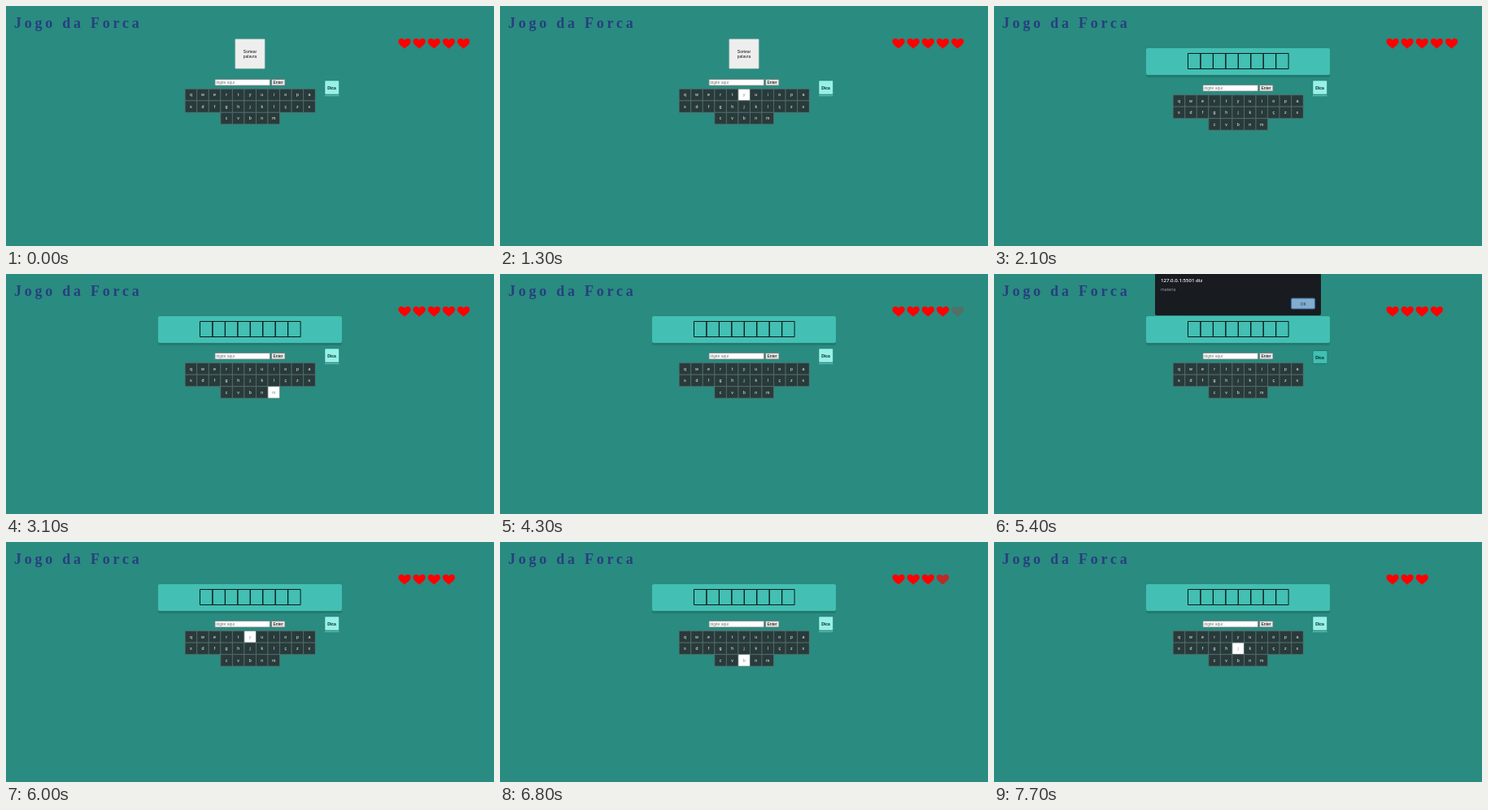
Animation, 600 px wide and 296 px high, one loop 8 s. Source, as an HTML page with a canvas:

```html
<!DOCTYPE html>
<html lang="pt">
<head>
<meta charset="utf-8">
<title>Jogo da Forca</title>
<style>
  html, body { margin: 0; width: 100%; height: 100%; overflow: hidden; background: #2a8b80; }
  canvas { display: block; }
</style>
</head>
<body>
<canvas id="stage" width="600" height="296"></canvas>
<script>
const ctx = document.getElementById('stage').getContext('2d');
const LOOP = 8000;
const SANS = '"Liberation Sans", Arial, sans-serif';
const DIALOG = '"Open Sans", "Noto Sans", sans-serif';
const KEY_ROWS = ['qwertyuiopa', 'sdfghjklçzx', 'cvbnm'];
const KEY = 14.55;

// Each entry: start time and what the pointer rests on from then.
const pointer = [
  [0, ''], [500, 'j'], [600, 'y'], [700, 'sortear'],
  [1100, 'y'], [1800, 'sortear'], [2000, ''],
  [2700, 'y'], [2800, 'j'], [2900, 'n'], [3000, 'm'],
  [3800, ''], [4800, 'dica'], [5500, ''], [5700, 'y'],
  [6100, 'j'], [6300, 'b'], [7500, 'h'], [7600, 'j']
];
const BOARD_AT = 2000;
const ALERT = [5000, 5500];
const MISSES = [3500, 6500];
const FADE = 1000;

function box(x, y, w, h, fill, stroke, line = 1, radius = 0) {
  ctx.beginPath();
  ctx.roundRect(x, y, w, h, radius);
  if (fill) { ctx.fillStyle = fill; ctx.fill(); }
  if (stroke) { ctx.strokeStyle = stroke; ctx.lineWidth = line; ctx.stroke(); }
}

function text(str, x, y, font, color, align = 'center') {
  ctx.font = font;
  ctx.fillStyle = color;
  ctx.textAlign = align;
  ctx.fillText(str, x, y);
}

function drawTitle() {
  ctx.letterSpacing = '3.75px';
  text('Jogo da Forca', 10, 27, 'bold 18px "Liberation Serif", "Times New Roman", serif', '#263f7e', 'left');
  ctx.letterSpacing = '0px';
}

function drawHeart(cx, alpha) {
  ctx.globalAlpha = alpha;
  ctx.fillStyle = '#f00';
  ctx.beginPath();
  ctx.moveTo(cx, 52.6);
  ctx.bezierCurveTo(cx - 3, 49.6, cx - 7.6, 47.6, cx - 7.6, 43.6);
  ctx.bezierCurveTo(cx - 7.6, 39, cx - 1.8, 38.8, cx, 42.3);
  ctx.bezierCurveTo(cx + 1.8, 38.8, cx + 7.6, 39, cx + 7.6, 43.6);
  ctx.bezierCurveTo(cx + 7.6, 47.6, cx + 3, 49.6, cx, 52.6);
  ctx.fill();
  ctx.globalAlpha = 1;
}

function drawHearts(t) {
  for (let i = 0; i < 5; i++) {
    const miss = MISSES[4 - i] ?? Infinity;
    const alpha = Math.max(0, Math.min(1, 1 - (t - miss) / FADE));
    drawHeart(490 + i * 18.15, alpha);
  }
}

function drawSortear(hover) {
  box(282, 41, 36, 36, hover ? '#e2e2e2' : '#eee', '#d5d9d8', 0.8);
  text('Sortear', 300, 57.8, `5px ${SANS}`, '#111');
  text('palavra', 300, 64, `5px ${SANS}`, '#111');
}

function drawBoard() {
  box(187, 54, 226, 34, '#247a70', null, 1, 2);
  box(187, 52, 226, 33, '#43bfb3', null, 1, 2);
  for (let i = 0; i < 8; i++) box(238.5 + i * 15.45, 58.5, 15.45, 19, null, '#0b1a19');
}

function drawInput(y) {
  box(257, y + 0.5, 67.5, 7.5, '#fff', '#7c8583', 0.8);
  text('digite aqui', 258.3, y + 5.9, `5px ${SANS}`, '#777', 'left');
  box(326.5, y + 0.5, 16.5, 7.5, '#e6e6e6', '#777', 0.8, 0.5);
  text('Enter', 334.5, y + 6, `5px ${SANS}`, '#000');
}

function drawKeys(top, hovered) {
  KEY_ROWS.forEach((row, r) => {
    const left = 300.2 - row.length * KEY / 2;
    [...row].forEach((letter, c) => {
      const x = left + c * KEY, y = top + r * 14.5;
      const on = letter === hovered;
      box(x, y, KEY, 14.5, on ? '#fff' : '#293a3b', '#5b7472', 0.7);
      text(letter, x + KEY / 2, y + 9, `5.4px ${SANS}`, on ? '#8a8a8a' : '#f2f6f5');
    });
  });
}

function drawDica(hover) {
  if (hover) {
    box(392, 94.5, 18, 16, '#41bfb2', '#1f6f67', 0.8, 1);
  } else {
    box(392, 109.8, 17.5, 1.4, '#62b9af');
    box(392, 92, 17.5, 17, '#96f1e7', '#237a70', 0.5, 1);
  }
  text('Dica', 400.6, hover ? 104.7 : 102.6, `bold 5px ${SANS}`, '#06201d');
}

function drawAlert() {
  box(198, -4, 204, 55, '#181c20', null, 1, 2);
  text('127.0.0.1:5501 diz', 205, 10, `600 6.1px ${DIALOG}`, '#f1f3f4', 'left');
  text('materia', 205, 21, `5.1px ${DIALOG}`, '#a5a8ab', 'left');
  box(365.5, 30, 29, 13, '#83add0', '#3d6c9c', 1.2, 1.5);
  text('OK', 380, 38.5, `5.2px ${DIALOG}`, '#1d3043');
}

function draw(t) {
  const hovered = pointer.findLast(([start]) => t >= start)[1];
  const playing = t >= BOARD_AT;
  box(0, 0, 600, 296, '#2a8b80');
  drawTitle();
  drawHearts(t);
  if (playing) drawBoard();
  else drawSortear(hovered === 'sortear');
  drawInput(playing ? 97 : 90);
  drawKeys(playing ? 109.7 : 102.3, hovered);
  drawDica(hovered === 'dica');
  if (t >= ALERT[0] && t < ALERT[1]) drawAlert();
}

const begin = performance.now();
function tick() {
  draw((performance.now() - begin) % LOOP);
  requestAnimationFrame(tick);
}
tick();
</script>
</body>
</html>
```
